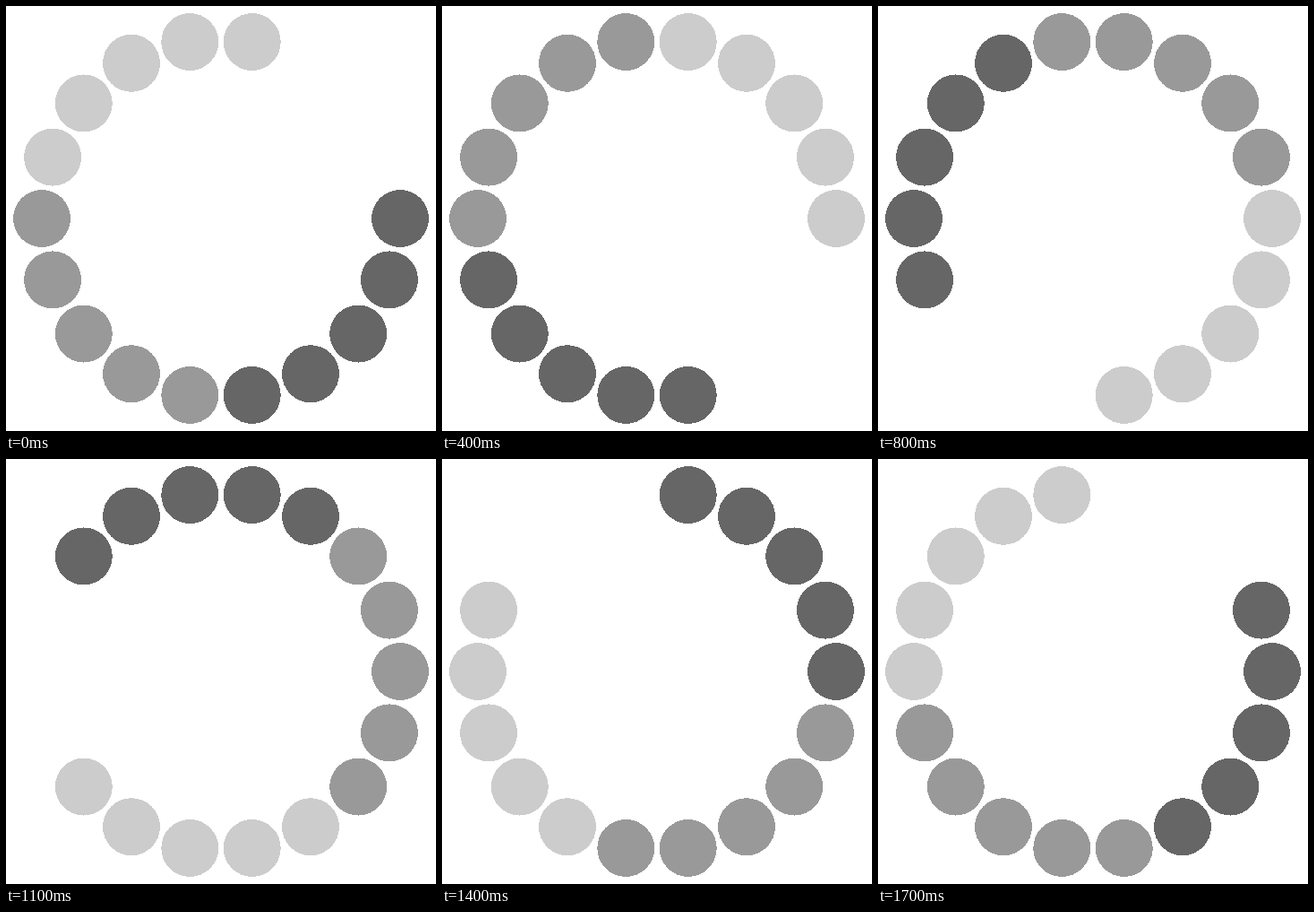
Animation, 480 px wide and 474 px high, one loop 1800 ms. Source, as an HTML page:

```html
<!DOCTYPE html>
<html lang="en">
<head>
<meta charset="utf-8">
<title>Loading ring</title>
<style>
html, body { margin: 0; width: 100%; height: 100%; overflow: hidden; background: #fff; }
svg { display: block; }
</style>
</head>
<body>
<svg id="stage" width="480" height="474" viewBox="0 0 480 474" shape-rendering="crispEdges"></svg>
<script>
const SLOTS = 18, STEP = 100;
const CX = 240, CY = 237, RING = 200, DOT = 32;
const COLORS = ['#666', '#999', '#ccc'];
const PER_COLOR = 5;

const stage = document.getElementById('stage');
const dots = Array.from({ length: SLOTS }, (_, i) => {
  const angle = i * 2 * Math.PI / SLOTS;
  const dot = document.createElementNS('http://www.w3.org/2000/svg', 'circle');
  dot.setAttribute('cx', (CX + RING * Math.cos(angle)).toFixed(2));
  dot.setAttribute('cy', (CY + RING * Math.sin(angle)).toFixed(2));
  dot.setAttribute('r', DOT);
  return stage.appendChild(dot);
});

// The colour pattern moves one slot clockwise per step; three slots stay empty.
function draw(ms) {
  const shift = Math.floor(ms / STEP) % SLOTS;
  dots.forEach((dot, i) => {
    const place = (i - shift + SLOTS) % SLOTS;
    dot.setAttribute('fill', COLORS[Math.floor(place / PER_COLOR)] || 'none');
  });
}

let start;
function tick(now) {
  start ??= now;
  draw(now - start);
  requestAnimationFrame(tick);
}
draw(0);
requestAnimationFrame(tick);
</script>
</body>
</html>
```
